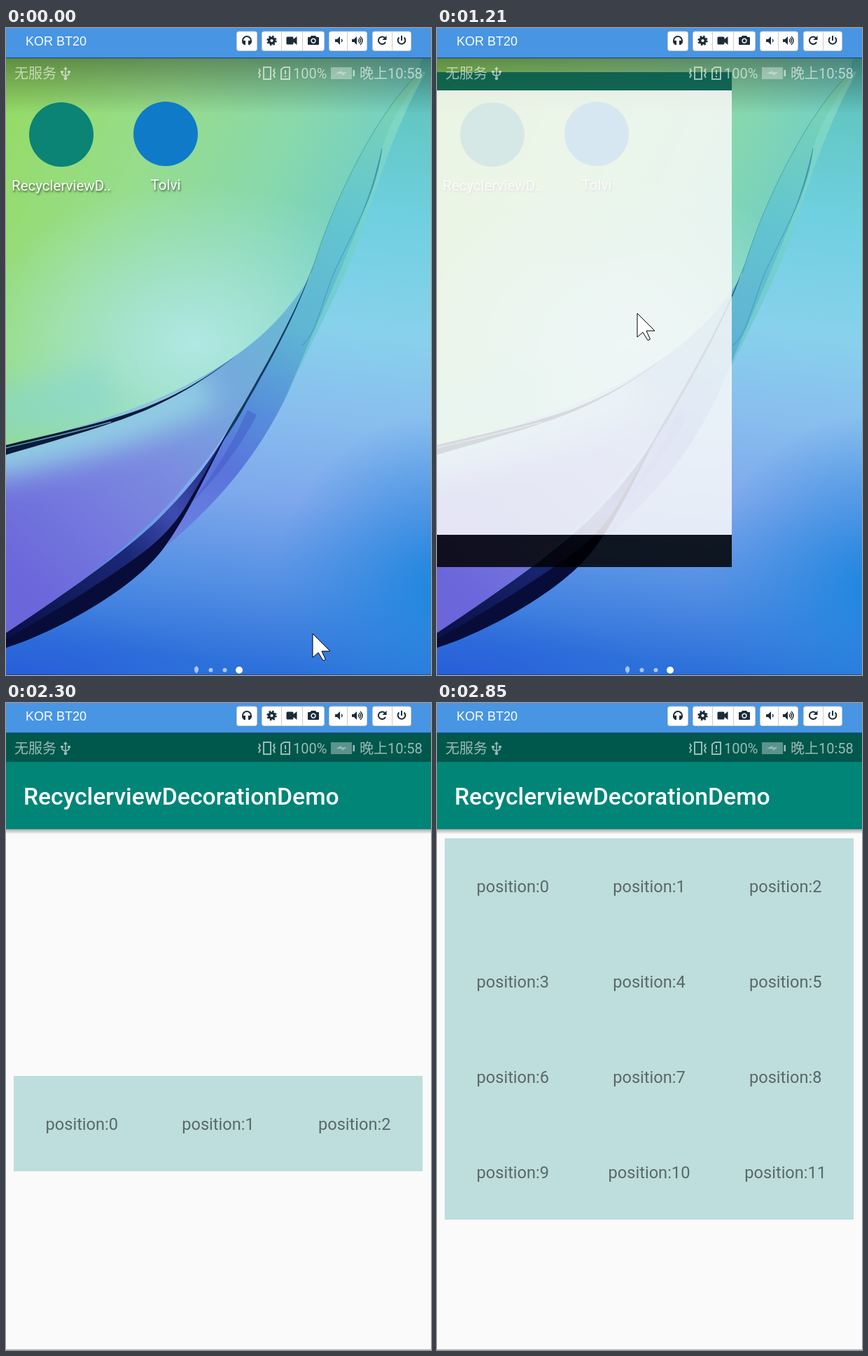
These frames come from a looping animation (607 by 923 pixels, 3480 ms). An HTML page:

```html
<!DOCTYPE html>
<html lang="zh">
<head>
<meta charset="utf-8">
<title>Screen</title>
<style>
  html, body { margin: 0; height: 100%; overflow: hidden; }
  svg { display: block; width: 100vw; height: 100vh; }
  text { font-family: Roboto, "Noto Sans CJK SC", "Noto Sans CJK", sans-serif; }
  .label { font-size: 20.5px; fill: #fff; text-anchor: middle; text-shadow: 1px 2px 3px #0009; }
  .item { font-size: 23.6px; fill: #000; fill-opacity: .53; text-anchor: middle; }
  .line { fill: none; stroke: currentColor; stroke-width: 2; }
</style>
</head>
<body>
<svg viewBox="0 0 607 923" preserveAspectRatio="none">
  <defs>
    <linearGradient id="sky" gradientUnits="userSpaceOnUse" x1="540" y1="60" x2="440" y2="923">
      <stop offset="0" stop-color="#5ec3b8"/><stop offset=".24" stop-color="#6fd0e0"/>
      <stop offset=".43" stop-color="#88d1ec"/><stop offset=".58" stop-color="#88bdee"/>
      <stop offset=".72" stop-color="#7ea8ec"/><stop offset=".86" stop-color="#5590e4"/>
      <stop offset="1" stop-color="#2c70da"/>
    </linearGradient>
    <linearGradient id="leaf" gradientUnits="userSpaceOnUse" x1="0" y1="110" x2="470" y2="330">
      <stop offset="0" stop-color="#95db66"/><stop offset=".4" stop-color="#97dd8c"/>
      <stop offset=".75" stop-color="#88d8ac"/><stop offset="1" stop-color="#74d0c4"/>
    </linearGradient>
    <linearGradient id="violet" gradientUnits="userSpaceOnUse" x1="420" y1="380" x2="20" y2="790">
      <stop offset="0" stop-color="#66bcd2"/><stop offset=".28" stop-color="#74a9dd"/>
      <stop offset=".55" stop-color="#7b8be0"/><stop offset="1" stop-color="#6c66db"/>
    </linearGradient>
    <linearGradient id="glass" gradientUnits="userSpaceOnUse" x1="580" y1="70" x2="250" y2="720">
      <stop offset="0" stop-color="#7fd5ae"/><stop offset=".3" stop-color="#63c6cf"/>
      <stop offset=".55" stop-color="#5fb4d4"/><stop offset=".72" stop-color="#568edb"/>
      <stop offset=".85" stop-color="#5a74dc"/><stop offset="1" stop-color="#6b7fe0"/>
    </linearGradient>
    <linearGradient id="ink" gradientUnits="userSpaceOnUse" x1="300" y1="600" x2="30" y2="880">
      <stop offset="0" stop-color="#1c2878"/><stop offset=".28" stop-color="#3e4cb0"/>
      <stop offset=".5" stop-color="#1c2878"/><stop offset="1" stop-color="#0a1248"/>
    </linearGradient>
    <linearGradient id="shade" x2="0" y2="1">
      <stop offset="0" stop-opacity=".36"/><stop offset="1" stop-opacity="0"/>
    </linearGradient>
    <linearGradient id="drop" x2="0" y2="1">
      <stop offset="0" stop-opacity=".32"/><stop offset="1" stop-opacity="0"/>
    </linearGradient>
    <radialGradient id="mist">
      <stop offset="0" stop-color="#b0e8e4"/><stop offset=".35" stop-color="#aee6de" stop-opacity=".7"/>
      <stop offset="1" stop-color="#a8e6d8" stop-opacity="0"/>
    </radialGradient>
    <radialGradient id="deep">
      <stop offset="0" stop-color="#1a86de"/><stop offset="1" stop-color="#2a86de" stop-opacity="0"/>
    </radialGradient>
    <radialGradient id="royal">
      <stop offset="0" stop-color="#2458da"/><stop offset="1" stop-color="#3066dc" stop-opacity="0"/>
    </radialGradient>
    <filter id="soft" filterUnits="userSpaceOnUse" x="-100" y="300" width="600" height="500"><feGaussianBlur stdDeviation="20"/></filter>
    <path id="leafShape" d="M0,43 H594 L588,66 C535,115 468,240 434,355 C395,418 350,455 300,486 C210,542 110,568 0,598 Z"/>
    <path id="violetShape" d="M0,598 C110,568 210,542 300,486 C350,455 395,418 434,355 C415,405 385,457 340,535 C312,582 290,615 262,645 C200,725 90,805 0,866 Z"/>
    <clipPath id="inLeaf"><use href="#leafShape"/></clipPath>
    <clipPath id="inViolet"><use href="#violetShape"/></clipPath>
    <clipPath id="inList"><rect x="0" y="193" width="607" height="544"/></clipPath>
  </defs>

  <g id="home">
    <rect y="43" width="607" height="880" fill="url(#sky)"/>
    <ellipse cx="630" cy="800" rx="250" ry="250" fill="url(#deep)"/>
    <ellipse cx="10" cy="945" rx="310" ry="120" fill="url(#royal)"/>
    <use href="#leafShape" fill="url(#leaf)"/>
    <g clip-path="url(#inLeaf)">
      <ellipse cx="270" cy="450" rx="320" ry="230" fill="url(#mist)"/>
      <path d="M-60,560 C60,540 110,525 150,510" stroke="#86d6d2" stroke-width="80" opacity=".6" fill="none" filter="url(#soft)"/>
    </g>
    <use href="#violetShape" fill="url(#violet)"/>
    <g clip-path="url(#inViolet)">
      <path d="M-60,620 C110,585 210,555 290,510" stroke="#92cfe4" stroke-width="62" fill="none" filter="url(#soft)"/>
    </g>
    <path fill="url(#glass)" d="M590,64 C535,115 468,240 434,355 C415,405 385,457 340,535 C310,585 280,640 230,738 C310,672 365,600 402,522 C430,460 478,370 505,300 C528,235 550,150 600,62 Z"/>
    <path fill="#84dcd0" opacity=".55" d="M596,62 C570,100 545,140 537,172 C525,240 480,340 430,455 L400,526 C440,440 480,365 505,300 C528,235 550,150 600,62 Z"/>
    <path class="line" color="#3a9ab4" style="stroke-width:1.2" opacity=".7" d="M537,172 C528,240 495,290 468,350 C450,395 442,440 422,453"/>
    <path fill="#2a6fa4" opacity=".7" d="M537,170 C532,210 516,250 497,290 C516,250 527,215 537,170 Z"/>
    <path class="line" color="#4ba89c" style="stroke-width:1" d="M588,66 C535,115 468,240 436,350"/>
    <path fill="#123a5c" d="M440,335 C416,400 385,457 340,535 C325,560 315,576 305,597 L318,578 C326,566 333,555 343,536 C387,460 418,400 440,335 Z"/>
    <path fill="url(#ink)" d="M322,566 C295,615 265,652 230,688 C185,738 80,810 0,863 V884 C70,862 185,800 228,738 C262,690 288,632 322,566 Z"/>
    <path fill="#070d38" d="M322,566 C300,606 284,636 264,670 C246,702 228,722 200,745 C140,790 60,838 0,872 V884 C70,862 185,800 228,738 C262,690 288,632 322,566 Z"/>
    <path fill="#3a50c0" opacity=".4" d="M345,545 C325,590 295,640 262,680 C285,660 335,600 358,552 Z"/>
    <path fill="#081c3a" d="M0,595 C60,580 140,564 200,541 C250,521 290,497 330,466 C290,498 250,523 200,545 C140,570 70,588 0,609 Z"/>
    <path class="line" color="#6a9cb4" style="stroke-width:1.5" d="M0,599 C50,587 100,576 150,562"/>
    <rect y="43" width="607" height="80" fill="url(#shade)"/>

    <circle cx="79" cy="152" r="46" fill="#0b8375"/>
    <circle id="press" cx="79" cy="152" r="46" fill-opacity=".3"/>
    <circle cx="228" cy="151" r="46" fill="#0f7bc8"/>
    <text class="label" x="79" y="232">RecyclerviewD..</text>
    <text class="label" x="228" y="231">Tolvi</text>
    <g fill="#fff">
      <path d="M269,913 L272,910 L275,913 V917 L272,921 L269,917 Z" opacity=".6"/>
      <circle cx="292.500" cy="916" r="3" opacity=".6"/>
      <circle cx="312.500" cy="916" r="3" opacity=".6"/>
      <circle cx="333" cy="916" r="5"/>
    </g>
  </g>

  <g id="window">
    <rect id="page" fill="#fafafa"/>
    <rect id="top" fill="#00574b"/>
    <rect id="nav" fill="#000"/>
  </g>

  <g id="content">
    <rect y="180" width="607" height="7" fill="url(#drop)"/>
    <rect y="84" width="607" height="96" fill="#008577"/>
    <text x="25" y="145" font-size="33.700" font-weight="500" fill="#fff">RecyclerviewDecorationDemo</text>
    <g id="list" clip-path="url(#inList)"></g>
  </g>

  <g id="status" fill="#fff" color="#fff" opacity=".6" font-size="20">
    <text x="12" y="72">无服务</text>
    <path class="line" style="stroke-width:1.6" d="M85,58 V72 M80,63 V66 L85,69 L90,66 V62"/>
    <path d="M82,59 L85,55 L88,59 Z M78,61 h4 v3 h-4 Z M88,61 h4 v3 h-4 Z"/>
    <circle cx="85" cy="72" r="2.300"/>
    <path class="line" d="M368,56 h10 v17 h-10 Z M361,58 l2,3 l-2,3 l2,3 l-2,4 M384,58 l-2,3 l2,3 l-2,3 l2,4"/>
    <path class="line" d="M393,59 L397,56 H405 V73 H393 Z M399,60 V66 M399,68 V70"/>
    <text x="410" y="72">100%</text>
    <path opacity=".6" d="M464,56 H494 V73 H464 Z"/>
    <path d="M471,65 L479,61 V63.500 L487,63 L480,68 V65.500 Z"/>
    <rect x="495.500" y="60" width="2.500" height="9"/>
    <text x="505" y="72">晚上10:58</text>
  </g>

  <g id="toolbar">
    <rect width="607" height="43" fill="#4795e3"/>
    <rect y="42" width="607" height="1.300" fill="#1d4f86"/>
    <text x="28" y="25" font-size="18" fill="#fff" style="font-family:'Liberation Sans',Arial,sans-serif">KOR BT20</text>
    <g fill="#fff" stroke="#ccc">
      <rect x="329.500" y="5" width="29" height="27.500" rx="3"/>
      <rect x="365.500" y="5" width="89" height="27.500" rx="3"/>
      <rect x="461.500" y="5" width="54" height="27.500" rx="3"/>
      <rect x="523.500" y="5" width="55" height="27.500" rx="3"/>
      <path d="M393.500,5 v27 M423.500,5 v27 M487.500,5 v27 M551.500,5 v27"/>
    </g>
    <g fill="#1b2b38" color="#1b2b38">
      <path class="line" d="M338,20 V18 A6,6 0 0 1 350,18 V20"/>
      <path d="M339,18 h3 v6 h-2 l-3,-3 Z M349,18 h-3 v6 h2 l3,-3 Z"/>
      <circle class="line" cx="379.500" cy="18" r="3.800" style="stroke-width:3.400"/>
      <circle class="line" cx="379.500" cy="18" r="6" style="stroke-width:2.400" stroke-dasharray="2.400 2.312"/>
      <path d="M402,12.500 h7 q1.500,0 1.500,1.500 v2 l5,-4 v12 l-5,-4 v2 q0,1.500 -1.500,1.500 h-7 q-1.500,0 -1.500,-1.500 v-8 q0,-1.500 1.500,-1.500 Z"/>
      <path fill-rule="evenodd" d="M432,13 h2.500 l1.500,-2 h6 l1.500,2 h2.500 q1,0 1,1 v9 q0,1 -1,1 h-14 q-1,0 -1,-1 v-9 q0,-1 1,-1 Z M439,14.500 a3.700,3.700 0 1 0 .01,0 Z"/>
      <circle cx="439" cy="18.200" r="2.200"/>
      <path id="speaker" d="M470,16 h3 l4,-4 v12 l-4,-4 h-3 Z"/>
      <use href="#speaker" x="24"/>
      <path class="line" style="stroke-width:1.400" d="M479,16 q2,2 0,4 M503,16 q2,2 0,4 M504.500,14 q4,4 0,8 M506,12 q6,6 0,12"/>
      <path class="line" d="M541,14 A5.300,5.300 0 1 0 542,20"/>
      <path d="M543.500,11 V17 H537.500 Z"/>
      <path class="line" d="M561.500,13.500 A5.300,5.300 0 1 0 568.500,13.500 M565,11 V18"/>
    </g>
  </g>
  <rect y="922" width="607" height="1" fill-opacity=".3"/>
  <path id="cursor" d="M0,0 V34 L8,27 L15,38.500 L18.500,37 L13,25 H25 Z" fill="#fff" stroke="#000" stroke-linejoin="round"/>
</svg>
<script>
  const LOOP = 3480;
  // Moments at which the screen refreshes.
  const ticks = [0, 70, 140, 210, 290, 360, 430, 510, 580, 660, 730, 800, 900, 970, 1050, 1130,
    1210, 1280, 1360, 1440, 1520, 1600, 2150, 2240, 2310, 2390, 2460, 2530, 2620, 2700, 2780, 2850];
  // Pointer path after the tap: time, x, y.
  const exitPath = [[900, 65, 166], [1130, 227, 301], [1210, 286, 407], [1600, 520, 945]];

  const $ = id => document.getElementById(id);
  const progress = (t, from, to) => Math.min(1, Math.max(0, (t - from) / (to - from)));
  const mix = (a, b, p) => a + (b - a) * p;
  const show = (id, on) => $(id).style.display = on ? '' : 'none';
  const setRect = (id, x, y, width, height) => {
    for (const [key, value] of Object.entries({ x, y, width, height })) $(id).setAttribute(key, value);
  };

  $('list').innerHTML = [0, 1, 2, 3].map(row =>
    '<g><rect x="11" width="584" height="136" fill="#bedddd"/>' + [0, 1, 2].map(col =>
      `<text class="item" x="${108.3 + col * 194.7}" y="77">position:${row * 3 + col}</text>`).join('') + '</g>').join('');
  const rows = [...$('list').children];

  function pointerAt(t) {
    if (t <= 900) {
      const u = progress(t, 0, 810);
      const p = u ** 3 * (10 - 15 * u + 6 * u * u);
      return [mix(438, 65, p), mix(864, 166, p)];
    }
    const i = Math.max(1, exitPath.findIndex(key => key[0] >= t));
    const [a, b] = [exitPath[i - 1], exitPath[i]];
    const p = progress(t, a[0], b[0]);
    return [mix(a[1], b[1], p), mix(a[2], b[2], p)];
  }

  function drawWindow(t) {
    show('window', t >= 1210);
    show('home', t < 1600);
    const p = 1 - (1 - progress(t, 1210, 1600)) ** 2.5;
    const y = mix(63, 43, p), width = mix(421, 607, p), height = mix(706, 1040, p);
    const bar = mix(26, 41, p), nav = mix(46, 80, p);
    setRect('page', 0, y + bar, width, height - bar - nav);
    setRect('top', 0, y, width, bar);
    setRect('nav', 0, y + height - nav, width, nav);
    $('window').setAttribute('opacity', mix(.85, 1, p));
  }

  function drawContent(t) {
    show('content', t >= 2150);
    $('content').setAttribute('opacity', t < 2240 ? .88 : 1);
    const clock = t + 590 * progress(t, 2460, 2620);
    rows.forEach((row, i) => {
      const start = 2113 + 219 * i;
      const offset = 544 * (1 - progress(clock, start, start + 602)) ** 2;
      row.setAttribute('transform', `translate(0 ${Math.round(193 + 136 * i + offset)})`);
    });
  }

  function draw(t) {
    drawWindow(t);
    drawContent(t);
    show('press', t >= 900 && t < 1130);
    show('cursor', t < 1600);
    if (t < 1600) {
      const [x, y] = pointerAt(t).map(Math.round);
      $('cursor').setAttribute('transform', `translate(${x} ${y})`);
    }
  }

  const begin = performance.now();
  function loop() {
    const now = (performance.now() - begin) % LOOP;
    draw(ticks.filter(tick => tick <= now).pop());
    requestAnimationFrame(loop);
  }
  loop();
</script>
</body>
</html>
```
